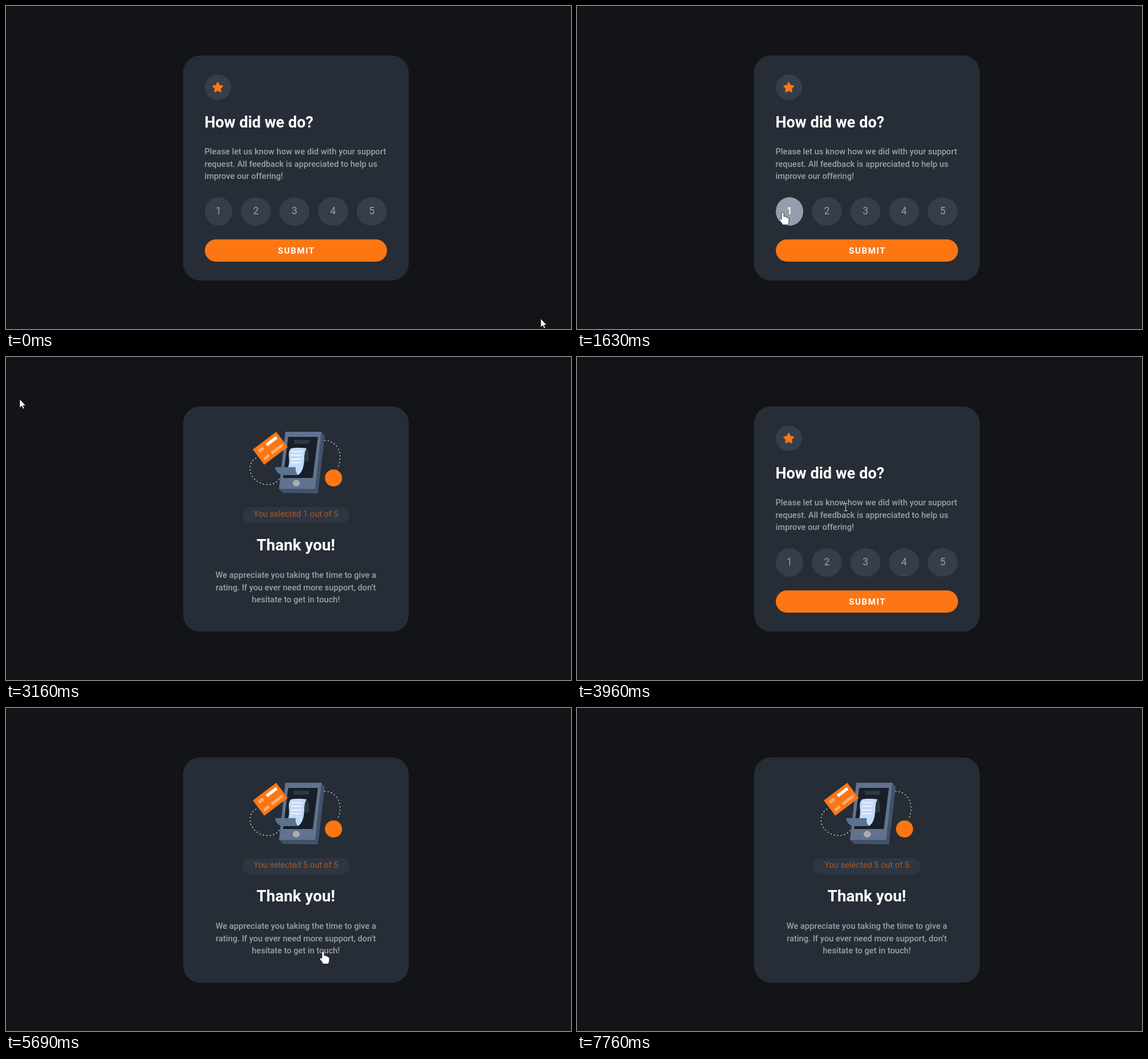
Write an HTML page that moves like this. It is 989 by 566 pixels and loops after 8 s.

```html
<!DOCTYPE html>
<html lang="en">
<head>
<meta charset="utf-8">
<title>Rating card</title>
<style>
  html, body { margin: 0; height: 100%; overflow: hidden; background: #121417; }
  svg { display: block; font-family: Roboto, sans-serif; cursor: default; }
  .title { font-size: 27px; font-weight: 700; fill: #fff; }
  .body { font-size: 14.65px; font-weight: 500; fill: #9ba0a8; }
  .center { text-anchor: middle; }
  .rating { fill: #353e4b; }
  .digit { font-size: 17.5px; fill: #a09e9f; text-anchor: middle; }
  .selected .rating { fill: #959eac; }
  .selected .digit { fill: #fff; font-weight: 500; }
  .submit { fill: #fc7614; }
  .submit + text { font-size: 15px; font-weight: 700; letter-spacing: 1.6px; fill: #fff; }
  .hover .submit { fill: #fff; }
  .hover .submit + text { fill: #fc7614; }
</style>
</head>
<body>
<svg width="989" height="566" viewBox="0 0 989 566">
  <rect x="310" y="86.5" width="395" height="394.7" rx="29.5" fill="#262d36"/>

  <g id="question">
    <ellipse cx="371" cy="142.4" rx="23" ry="22.4" fill="#353e4b"/>
    <path id="star" transform="translate(370.6 143)" fill="#fc7614" stroke="#fc7614" stroke-width="2.4" stroke-linejoin="round"/>
    <text class="title" x="347.5" y="213">How did we do?</text>
    <g class="body">
      <text x="347.5" y="260">Please let us know how we did with your support</text>
      <text x="347.5" y="282">request. All feedback is appreciated to help us</text>
      <text x="347.5" y="303">improve our offering!</text>
    </g>
    <g id="ratings"></g>
    <g id="button">
      <rect class="submit" x="348" y="409" width="319" height="39" rx="19.5"/>
      <text x="476" y="434">SUBMIT</text>
    </g>
  </g>

  <g id="thanks">
    <g fill="none" stroke="#fff" stroke-width="1.2" stroke-dasharray="2 4">
      <path d="M438 177C428 182 424 195 430 207C438 222 458 228 472 220Q478 216 482 209"/>
      <path d="M557 146C580 146 592 170 580 196"/>
    </g>
    <path fill="#43526b" d="M489 131H552L558 138 546 239 485 238 478 231Z"/>
    <path fill="#62738f" d="M489 131H552L541 231H478Z"/>
    <path fill="#191f28" d="M494 140H546L537 212H485Z"/>
    <path fill="#2d3746" d="M504 145H531L530 152H504ZM520 160H526Q531 162 530 183H520Z"/>
    <path fill="#c3daf8" d="M499 160Q512 158 526 160Q522 166 522 180Q521 201 511 207Q492 207 493 196Q497 188 495 172Q495 163 499 160Z"/>
    <path stroke="#fff" stroke-width="1.3" d="M500 166H518M499 172H517M499 179H517M499 185H516"/>
    <path fill="#5a7391" d="M471 193H507Q506 203 512 207H486Q473 206 471 193Z"/>
    <ellipse cx="508" cy="221" rx="6.3" ry="5.8" fill="#a9adb3"/>
    <g transform="translate(432 162) rotate(-37)">
      <rect width="51.4" height="33.4" fill="#fc7614"/>
      <rect x="24" y="5.5" width="22" height="5.5" fill="#fff"/>
      <g fill="#fdae74">
        <circle cx="9.5" cy="9" r="3.4"/>
        <circle cx="13.5" cy="9" r="3.4" stroke="#fc7614" stroke-width=".8"/>
        <rect x="5" y="23" width="12" height="5" rx="2"/>
        <rect x="22" y="22.5" width="25" height="5" rx="2"/>
      </g>
    </g>
    <circle cx="573.3" cy="212" r="15" fill="#fc7614"/>
    <rect id="pill" y="263" height="28" rx="14" fill="#2d3642"/>
    <text id="result" class="center" x="507.5" y="280" font-size="14.6" fill="#ad5822"></text>
    <text class="title center" x="507.3" y="339" style="font-size:27.8px">Thank you!</text>
    <g class="body center">
      <text x="507.3" y="387">We appreciate you taking the time to give a</text>
      <text x="507.3" y="409">rating. If you ever need more support, don’t</text>
      <text x="507.3" y="430">hesitate to get in touch!</text>
    </g>
  </g>

  <g id="cursor">
    <path id="arrow" d="M0 0V15L3.5 11.7 6 17 8.2 16 5.8 11H10.4Z" fill="#fff" stroke="#111" stroke-width=".7"/>
    <path id="hand" d="M-2 .5Q0-2 2 .5V7Q5 5.5 6 8Q8.5 7 9 9.5Q11 9 11 11V16Q11 18 9 21.5H0Q-2 17-5.5 13.5Q-6 9-2 12Z" fill="#fff" stroke="#111" stroke-width=".8"/>
    <path id="beam" d="M-2.5-6.5H3.5M.5-6.5V6.5M-2.5 6.5H3.5" fill="none" stroke="#ddd"/>
  </g>
</svg>
<script>
const $ = id => document.getElementById(id);
const show = (id, visible) => { $(id).style.display = visible ? '' : 'none'; };
const LOOP = 8000;
const RELOAD = 3830;

// Each eased pointer move: where it goes and when
const moves = [
  { from: 70, to: 880, x: 449, y: 354 },      // rating 2
  { from: 880, to: 1630, x: 360, y: 362 },    // rating 1
  { from: 1630, to: 2030, x: 464, y: 433 },   // submit
  { from: 2360, to: 2640, x: 493, y: 290 },   // result
  { from: 2640, to: 3160, x: 24, y: 74 },     // leave
  { from: 3230, to: RELOAD, x: 10, y: 0 },    // outside the page
  { from: RELOAD, to: 3960, x: 470, y: 263 },
  { from: 4030, to: 4590, x: 636, y: 365 },   // rating 5
  { from: 4870, to: 5070, x: 594, y: 386 },
  { from: 5070, to: 5420, x: 555, y: 427 },   // submit
  { from: 5690, to: 6440, x: 99, y: 18 },
  { from: 6440, to: 7140, x: 554, y: 304 },   // result
  { from: 7140, to: 7760, x: 9, y: 18 }       // leave
];

function pointer(t) {
  let x = 936, y = 548;
  for (const m of moves) {
    if (t < m.from) break;
    const k = Math.min(1, (t - m.from) / (m.to - m.from));
    const ease = k * k * (3 - 2 * k);
    x += (m.x - x) * ease;
    y += (m.y - y) * ease;
  }
  return { x: Math.round(x), y: Math.round(y) };
}

function isOver(p, selector) {
  return [...document.querySelectorAll(selector)].some(element => {
    const { x, y, width, height } = element.getBBox();
    return p.x > x && p.x < x + width && p.y > y && p.y < y + height;
  });
}

function draw(t) {
  const first = t < RELOAD;
  const asking = first ? t < 2030 : t < 5550;
  const choice = first ? 1 : 5;
  const picked = t >= (first ? 1350 : 4750);
  show('question', asking);
  show('thanks', !asking);

  [...$('ratings').children].forEach((rating, i) =>
    rating.classList.toggle('selected', picked && i + 1 === choice));
  const pillWidth = first ? 186 : 188.5;
  $('pill').setAttribute('x', 507.3 - pillWidth / 2);
  $('pill').setAttribute('width', pillWidth);
  $('result').textContent = `You selected ${choice} out of 5`;

  const p = pointer(t);
  $('button').classList.toggle('hover', isOver(p, '.submit'));
  const kind = isOver(p, '.rating, .submit') ? 'hand' : isOver(p, 'text') ? 'beam' : 'arrow';
  ['arrow', 'hand', 'beam'].forEach(id => show(id, id === kind));
  $('cursor').setAttribute('transform', `translate(${p.x} ${p.y})`);
  show('cursor', t < 3230 || (t >= RELOAD && t < 7760));
}

$('star').setAttribute('d', 'M' + Array.from({ length: 10 }, (_, i) => {
  const radius = i % 2 ? 4.4 : 8.7, angle = i * Math.PI / 5;
  return [radius * Math.sin(angle), -radius * Math.cos(angle)];
}).join(' ') + 'Z');

$('ratings').innerHTML = [0, 1, 2, 3, 4].map(i => {
  const rx = i ? 26.3 : 24, x = 396 + 67.6 * i - rx;
  return `<g><ellipse class="rating" cx="${x}" cy="360" rx="${rx}" ry="25"/>` +
    `<text class="digit" x="${x}" y="364.5">${i + 1}</text></g>`;
}).join('');

const start = performance.now();
function frame() {
  draw((performance.now() - start) % LOOP);
  requestAnimationFrame(frame);
}
frame();
</script>
</body>
</html>
```
